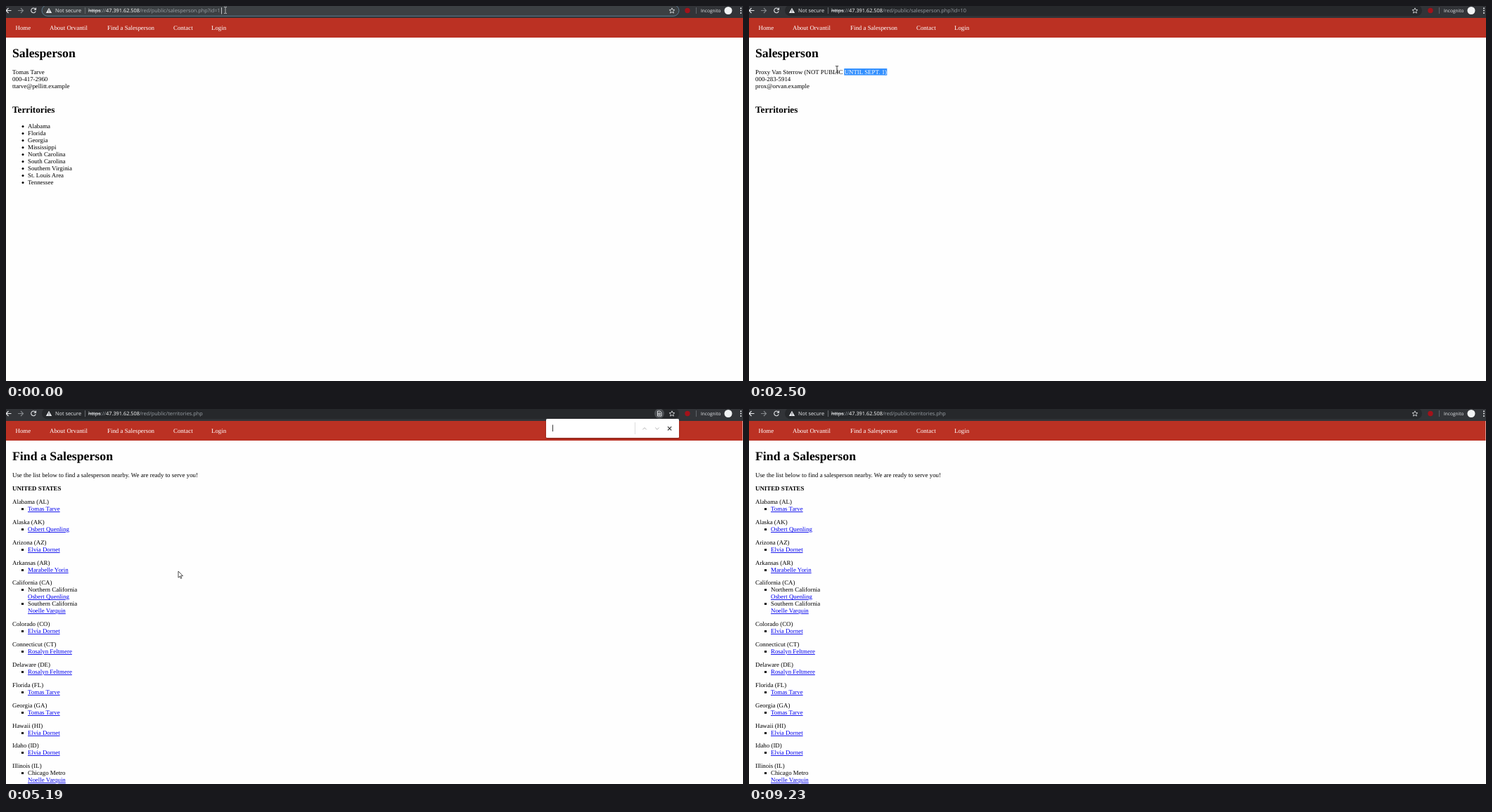
An HTML page for the animation above (9.35 s loop, 1048 by 534 pixels).

```html
<!DOCTYPE html>
<html lang="en">
<head>
<meta charset="utf-8">
<title>Salesperson pages</title>
<style>
html, body { margin: 0; width: 100%; height: 100%; overflow: hidden; background: #fefefe; }
svg { display: block; width: 1048px; height: 534px; }
text { font: 8.9px "Liberation Serif", serif; text-rendering: geometricPrecision; white-space: pre; }
.h1 { font-size: 17.75px; font-weight: 700; }
.h2 { font-size: 13.2px; font-weight: 700; }
.bold { font-weight: 700; }
.link { fill: #00e; text-decoration: underline; }
.nav { fill: #fff; }
.ui { font: 7.35px "Open Sans", sans-serif; fill: #e8eaed; }
.small { font-size: 6.55px; }
.dim { fill: #9aa0a6; }
.host { fill: #fff; }
.strike { fill: #e8eaed; text-decoration: line-through; }
.line { fill: none; stroke: #e8eaed; stroke-width: 1.1; }
</style>
</head>
<body>
<svg viewBox="0 0 1048 534">
  <defs>
    <clipPath id="selClip"><rect id="selClipBox" y="89" height="10"/></clipPath>
    <clipPath id="belowField"><rect y="14" width="1048" height="520"/></clipPath>
    <filter id="soft" x="-10%" y="-30%" width="120%" height="180%">
      <feDropShadow dx="0" dy="1" stdDeviation="1.3" flood-opacity=".35"/>
    </filter>
  </defs>
  <rect width="1048" height="534" fill="#fefefe"/>
  <rect id="nav" y="17" width="1048" height="28" fill="#bb3123"/>
  <g id="navText"></g>
  <g id="person"></g>
  <g id="draft">
    <rect id="selBox" y="89" height="9.6" fill="#3390ff"/>
  </g>
  <g id="finder"></g>

  <g id="drop">
    <rect x="35" y="17" width="933" height="52" rx="6" opacity=".11"/>
    <path d="M48 17H960V52a7 7 0 0 1-7 7H55a7 7 0 0 1-7-7Z" fill="#323639"/>
    <rect x="48" y="18" width="912" height="20" fill="#45494d"/>
    <g class="line"><circle cx="61" cy="28" r="3.3"/><path d="M57.7 28h6.6M61 24.7v6.6"/>
    <circle cx="60" cy="47.5" r="2.4"/><path d="M62 49.5l2.2 2.2"/></g>
  </g>

  <rect width="1048" height="17" fill="#323438"/>
  <rect id="field" x="51" y="-1.5" width="906" height="15.8" rx="7.9"/>
  <g class="line">
    <path d="M7.5 6.5H.5M3.5 3L0 6.5 3.5 10"/>
    <path d="M17 6.5h7.5M21 3l3.5 3.5L21 10" stroke="#85888c"/>
    <path id="reload" d="M41.6 4.3A3.3 3.3 0 1 0 42.2 7.3M42.5 2.5v2.7h-2.7"/>
    <path id="stop" d="M36 3.5l6 6M42 3.5l-6 6"/>
    <g id="info" stroke-width=".9"><circle cx="61" cy="6.5" r="3.4"/><path d="M61 6v2.7M61 4.2v1"/></g>
    <path d="M947 2.8l1.1 2.5 2.7.3-2 1.8.6 2.7-2.4-1.4-2.4 1.4.6-2.7-2-1.8 2.7-.3Z" stroke-width=".8"/>
    <g id="findIcon" stroke-width=".9">
      <circle cx="929" cy="6.5" r="7" fill="#4b4e52" stroke="none"/>
      <path d="M926.5 3h3.5l2 2v5h-5.5Z"/><circle cx="929" cy="7" r="1.3"/>
    </g>
  </g>
  <g id="warning">
    <path d="M61 2.7l4.2 7.3h-8.4Z" fill="#e8eaed"/>
    <path d="M61 5.2v2.3M61 8.2v.9" stroke="#323438" stroke-width=".9"/>
    <path d="M112.5 2v9" stroke="#66696d"/>
  </g>
  <circle cx="969" cy="6.5" r="3.7" fill="#a3121a"/>
  <path d="M981.5 2v9" stroke="#5f6368"/>
  <circle cx="1027" cy="6.5" r="5.5" fill="#f1f3f4"/>
  <g fill="#e8eaed"><circle cx="1045" cy="3.3" r="1"/><circle cx="1045" cy="6.6" r="1"/><circle cx="1045" cy="9.9" r="1"/></g>
  <g id="bar"></g>
  <path id="caret" d="M306.5 2v9.5" stroke="#e8eaed" stroke-width=".8"/>

  <g clip-path="url(#belowField)">
    <g id="findBar" filter="url(#soft)">
      <rect x="768" y="14" width="189" height="27" rx="1.5" fill="#fff"/>
      <path d="M894.5 19v17" stroke="#ddd"/>
      <path d="M905.3 29.3l2.7-2.7 2.7 2.7M923.3 26.5l2.7 2.7 2.7-2.7" fill="none" stroke="#b5b5b5"/>
      <path d="M941 25.2l5.2 5.2M946.2 25.2l-5.2 5.2" stroke="#333" stroke-width="1.2"/>
      <path id="findCaret" d="M777.5 22.5v9.5" stroke="#222" stroke-width=".9"/>
    </g>
  </g>

  <g id="cursor">
    <path id="beam" d="M-2-4.5h1.3l.7.5.7-.5H2M0-4v8M-2 4.5h1.3L0 4l.7.5H2" fill="none" stroke-width=".9"/>
    <path id="arrow" d="M-2-5v9.2l2.1-2 1.4 3.2 1.4-.6L1.5 1.7h3Z" fill="#fff" stroke="#222" stroke-width=".8"/>
    <path id="hand" d="M-2-4.5q1-1 1.8 0v3l3.7.9q.9.4.8 1.5L3.4 5.5h-4.6L-4 1.3q.3-1.2 2 .2Z" fill="#fff" stroke="#222" stroke-width=".7"/>
  </g>
</svg>
<script>
const LOOP = 9350;
const $ = id => document.getElementById(id);
const show = (id, on) => { $(id).style.display = on ? '' : 'none'; };

function add(parent, tag, attrs, text = '') {
  const el = document.createElementNS('http://www.w3.org/2000/svg', tag);
  for (const k in attrs) el.setAttribute(k, attrs[k]);
  el.textContent = text;
  return parent.appendChild(el);
}
const write = (id, x, y, text, cls = '') => add($(id), 'text', { x, y, class: cls }, text);

// Page contents
[[13.5, 'Home'], [62, 'About Orvantil'], [144, 'Find a Salesperson'], [238, 'Contact'], [292, 'Login']]
  .forEach(([x, label]) => write('navText', x, 34, label, 'nav'));

for (const id of ['person', 'draft']) {
  write(id, 9, 73, 'Salesperson', 'h1');
  write(id, 9, 152, 'Territories', 'h2');
}
['Tomas Tarve', '000-417-2960', 'ttarve@pellitt.example']
  .forEach((s, i) => write('person', 9, 97 + i * 10, s));
['Alabama', 'Florida', 'Georgia', 'Mississippi', 'North Carolina', 'South Carolina',
  'Southern Virginia', 'St. Louis Area', 'Tennessee'].forEach((s, i) => {
  const y = 174 + i * 10;
  write('person', 31, y, s);
  add($('person'), 'circle', { cx: 24, cy: y - 2.5, r: 1.5 });
});

const hidden = 'Proxy Van Sterrow (NOT PUBLIC UNTIL SEPT. 1)';
[hidden, '000-283-5914', 'prox@orvan.example']
  .forEach((s, i) => write('draft', 9, 97 + i * 10, s));
add($('draft'), 'text', { x: 9, y: 97, fill: '#fff', stroke: '#3390ff', 'stroke-width': 1.2,
  'paint-order': 'stroke', 'clip-path': 'url(#selClip)' }, hidden);

write('finder', 9, 73, 'Find a Salesperson', 'h1');
write('finder', 9, 97, 'Use the list below to find a salesperson nearby. We are ready to serve you!');
write('finder', 9, 116, 'UNITED STATES', 'bold');
const [tt, oq, ed, my, nv, rf] = ['Tomas Tarve', 'Osbert Quenling', 'Elvia Dornet',
  'Marabelle Yorin', 'Noelle Varquin', 'Rosalyn Feltmere'];
let rowY = 135;
[['Alabama (AL)', tt], ['Alaska (AK)', oq], ['Arizona (AZ)', ed], ['Arkansas (AR)', my],
  ['California (CA)', '*Northern California', oq, '*Southern California', nv],
  ['Colorado (CO)', ed], ['Connecticut (CT)', rf], ['Delaware (DE)', rf], ['Florida (FL)', tt],
  ['Georgia (GA)', tt], ['Hawaii (HI)', ed], ['Idaho (ID)', ed],
  ['Illinois (IL)', '*Chicago Metro', nv]].forEach(([state, ...rows]) => {
  const top = Math.round(rowY);
  write('finder', 9, top, state);
  rows.forEach((s, i) => {
    const y = top + 10 * (i + 1), area = s[0] === '*';
    write('finder', 31, y, area ? s.slice(1) : s, area ? '' : 'link');
    if (area || rows.length === 1) add($('finder'), 'rect', { x: 22, y: y - 4, width: 3, height: 3 });
  });
  rowY += 18.85 + 10 * rows.length;
});

// Browser bar
const HOST = '47.391.62.508', DIR = '/red/public/', PERSON = DIR + 'salesperson.php?id=1';
const insecure = write('bar', 70, 9.2, 'Not secure', 'ui');
write('bar', 988, 9, 'Incognito', 'ui small');
const url = write('bar', 117, 9.2, '', 'ui');
const [scheme, , , path] = [['https', 'strike'], ['://', 'dim'], [HOST, 'host'], ['', 'dim']]
  .map(([s, cls]) => add(url, 'tspan', { class: cls }, s));
const typedUrl = 'https://' + HOST + PERSON + '0';
write('drop', 75, 30.7, typedUrl, 'ui');
write('drop', 75, 50.7, typedUrl + ' - Fendro Search', 'ui');
const query = write('findBar', 777, 30.2, '', 'ui small');
const count = write('findBar', 875, 30.2, '0/0', 'ui small');
query.style.fill = '#333';
count.style.fill = '#777';

const RUNS = [[0, 0, 1], [270, 270, 1], [550, 550, 1], [950, 1310, 4], [1710, 2650, 8], [2770, 3490, 6],
  [3800, 4770, 8], [4890, 5620, 6], [6020, 6950, 8], [7070, 8090, 8], [8240, 9230, 8]];
function snap(t) {
  const [from, to, n] = RUNS.filter(r => r[0] <= t).pop();
  if (n === 1) return from;
  const gap = (to - from) / (n - 1);
  return from + gap * Math.min(n - 1, Math.floor((t - from) / gap + 0.15));
}

// Pointer path: [time, x, y]
const PATH = [[0, 312, 6], [269, 312, 6], [270, 327, 3], [1600, 327, 3], [2110, 198, 94], [2250, 194, 93],
  [2516, 125, 90], [2650, 30, 94], [2770, 26, 92], [3480, 182, 36], [4080, 182, 36], [4770, 247, 236],
  [5950, 247, 236], [6419, 694, 60], [6950, 824, 30], [7500, 703, 48], [8090, 943, 30],
  [8380, 943, 30], [9089, 1028, 528], [9230, 1030, 560]];
function pointer(t) {
  const i = PATH.findIndex(p => p[0] > t);
  if (i < 0) return PATH[PATH.length - 1].slice(1);
  const [a, x, y] = PATH[i - 1], [b, x2, y2] = PATH[i];
  const u = (t - a) / (b - a);
  return [x + (x2 - x) * u, y + (y2 - y) * u];
}

function drawPointer(t, finding) {
  const [x, y] = pointer(t);
  const inBox = finding && x > 770 && x < 893 && y > 14 && y < 41;
  const kind = y < 14 || (t > 1950 && t < 2800) || inBox ? 'beam'
    : x > 144 && x < 212 && y > 17 && y < 45 ? 'hand' : 'arrow';
  for (const id of ['beam', 'arrow', 'hand']) show(id, id === kind);
  $('beam').setAttribute('stroke', y < 17 ? '#c4c6c8' : '#222');
  $('cursor').setAttribute('transform', `translate(${x} ${y})`);
}

function render(t) {
  const editing = t >= 950 && t < 1300;
  const focused = t < 950;
  const loading = (t >= 1060 && t < 1300) || (t >= 3800 && t < 4340);
  const finder = t >= 4200;
  const finding = t >= 4890 && t < 8370;

  show('person', t < 1300);
  show('draft', t >= 1300 && !finder);
  show('finder', finder);
  $('nav').setAttribute('width', finder ? 1047.5 : 1048);

  const left = t < 2230 ? 196 : t < 2370 ? 188 : t < 2510 ? 165 : t < 2640 ? 135.3 : t < 2760 ? 23 : 9;
  for (const id of ['selBox', 'selClipBox']) {
    $(id).setAttribute('x', left);
    $(id).setAttribute('width', 196.3 - left);
  }
  show('selBox', left < 196);

  show('drop', t >= 950 && t < 1180);
  $('drop').setAttribute('opacity', t < 1060 ? 1 : 0.11);
  $('field').setAttribute('fill', focused ? '#3c4043' : '#26282b');
  $('field').setAttribute('stroke', focused ? '#5f7c8f' : 'none');
  show('caret', t < 550);
  show('reload', !loading);
  show('stop', loading);
  show('info', editing);
  show('warning', !editing);
  insecure.style.display = editing ? 'none' : '';
  url.setAttribute('x', editing ? 70 : 117);
  scheme.setAttribute('class', editing ? 'dim' : 'strike');
  path.textContent = finder ? DIR + 'territories.php' : focused ? PERSON : PERSON + '0';

  const typed = t < 5300 ? 0 : t < 5450 ? 1 : t < 5600 ? 3 : 4;
  query.textContent = 'test'.slice(0, typed);
  count.style.display = typed ? '' : 'none';
  show('findBar', finding);
  show('findIcon', finding);
  show('findCaret', t < 5300);
  $('findBar').setAttribute('transform', `translate(0 ${t < 5000 || t >= 8240 ? -12 : 0})`);

  drawPointer(t, finding);
}

const start = performance.now();
function tick() {
  render(snap((performance.now() - start) % LOOP));
  requestAnimationFrame(tick);
}
tick();
</script>
</body>
</html>
```
